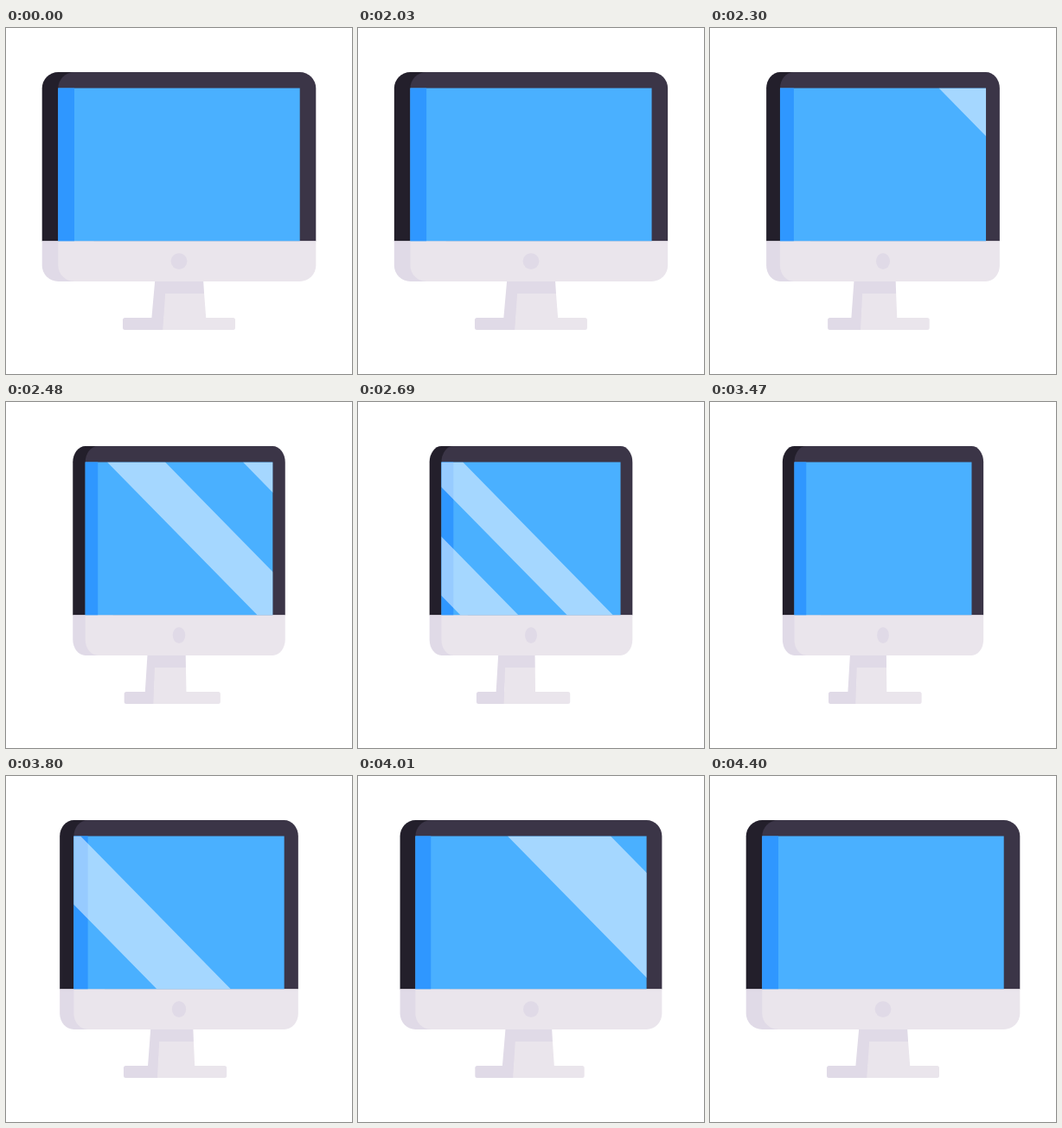
An HTML page with a canvas for the animation above (4.43 s loop, 400 px wide and 400 px high).

```html
<!DOCTYPE html>
<html lang="en">
<head>
<meta charset="utf-8">
<title>Turning monitor</title>
<style>
html, body { margin: 0; width: 100%; height: 100%; overflow: hidden; background: #fff; }
canvas { display: block; width: 400px; height: 400px; }
</style>
</head>
<body>
<canvas id="stage" width="400" height="400"></canvas>
<script>
const ctx = document.getElementById('stage').getContext('2d');
const LOOP = 4430, REST = 2000, STEP = 30;
const NARROW = 0.7328;   // horizontal scale when fully turned

const COLORS = {
  frame: '#3b3547', frameSide: '#231f2b',
  screen: '#4ab0ff', screenSide: '#2f97ff',
  light: '#eae5ec', shade: '#e0dae7'
};

const lerp = (a, b, p) => a + (b - a) * p;

// Ease along a cubic Bezier with control points (x1, 0) and (x2, 1).
function ease(x, x1, x2) {
  if (x <= 0) return 0;
  if (x >= 1) return 1;
  let lo = 0, hi = 1;
  for (let i = 0; i < 24; i++) {
    const s = (lo + hi) / 2, r = 1 - s;
    if (3 * r * r * s * x1 + 3 * r * s * s * x2 + s * s * s < x) lo = s;
    else hi = s;
  }
  return lo * lo * (3 - 2 * lo);
}

const turn = k => k < 40
  ? ease(k / 30, 0.33, 0.163)
  : 1 - ease((k - 48) / 32, 0.33, 0.315);

// Left ends, at the top of the screen, of the two reflections.
const shine = k => k < 40
  ? [117 - 24.6 * (k - 16), 274 - 29.4 * (k - 16)]
  : [173 + 24.6 * (k - 67), 239 + 29.4 * (k - 67)];

function poly(color, points) {
  ctx.fillStyle = color;
  ctx.beginPath();
  points.forEach(([x, y]) => ctx.lineTo(x, y));
  ctx.fill();
}

function rect(color, x, y, w, h, radii = 0) {
  ctx.fillStyle = color;
  ctx.beginPath();
  ctx.roundRect(x, y, w, h, radii);
  ctx.fill();
}

function drawStand(p) {
  const topL = lerp(172.4, 162, p), topR = lerp(228, 203.8, p);
  const botL = lerp(168.3, 159.3, p), botR = lerp(231.3, 204.2, p);
  const edge = lerp(184.2, 169.7, p), foot = lerp(181.3, 168.3, p);
  const baseL = lerp(135, 137, p), baseR = lerp(265, 244.6, p);
  const midR = lerp(topR, botR, 0.33);

  rect(COLORS.light, foot, 335, baseR - foot, 14, [0, 2.5, 2.5, 0]);
  rect(COLORS.shade, baseL, 335, foot + 0.5 - baseL, 14, [2.5, 0, 0, 2.5]);
  poly(COLORS.shade, [[topL, 290], [topR, 290], [midR, 307], [edge, 320], [foot, 349], [botL, 336]]);
  poly(COLORS.light, [[edge, 307], [midR, 307], [botR, 336], [botR, 349], [foot, 349]]);
}

function drawBody(p) {
  const scale = lerp(1, NARROW, p);
  ctx.save();
  ctx.translate(200, 0);
  ctx.scale(scale, 1);
  ctx.translate(-200, 0);

  rect(COLORS.frameSide, 41.7, 51, 60, 195.5, [18.6, 0, 0, 0]);
  rect(COLORS.frame, 60.3, 51, 298, 195.5, [18.6, 18.6, 0, 0]);
  rect(COLORS.shade, 41.7, 246.3, 60, 46.7, [0, 0, 0, 18.6]);
  rect(COLORS.light, 60.3, 246.3, 298, 46.7, [0, 0, 18.6, 18.6]);
  rect(COLORS.screen, 60.3, 69.6, 279.4, 176.7);
  rect(COLORS.screenSide, 60.3, 69.6, 18.7, 176.7);

  ctx.fillStyle = COLORS.shade;
  ctx.beginPath();
  ctx.arc(200, 269.6, 9.4, 0, Math.PI * 2);
  ctx.fill();
  ctx.restore();
  return scale;
}

function drawShine(k, scale) {
  const half = 139.7 * scale, top = 69.6, bottom = 246.3, slant = 173.5;
  const [first, second] = shine(k);
  ctx.save();
  ctx.beginPath();
  ctx.rect(200 - half, top, half * 2, bottom - top);
  ctx.clip();
  ctx.beginPath();
  for (const [x, w] of [[first, 67], [second, 53]]) {
    ctx.moveTo(x, top);
    ctx.lineTo(x + w, top);
    ctx.lineTo(x + w + slant, bottom);
    ctx.lineTo(x + slant, bottom);
    ctx.closePath();
  }
  ctx.fillStyle = 'rgba(255, 255, 255, 0.5)';
  ctx.fill();
  ctx.restore();
}

function draw(time) {
  const k = Math.max(0, Math.floor((time % LOOP - REST) / STEP));
  const p = turn(k);
  ctx.fillStyle = '#fff';
  ctx.fillRect(0, 0, 400, 400);
  drawStand(p);
  const scale = drawBody(p);
  if (k > 0) drawShine(k, scale);
}

const start = performance.now();
function tick() {
  draw(performance.now() - start);
  requestAnimationFrame(tick);
}
tick();
</script>
</body>
</html>
```
